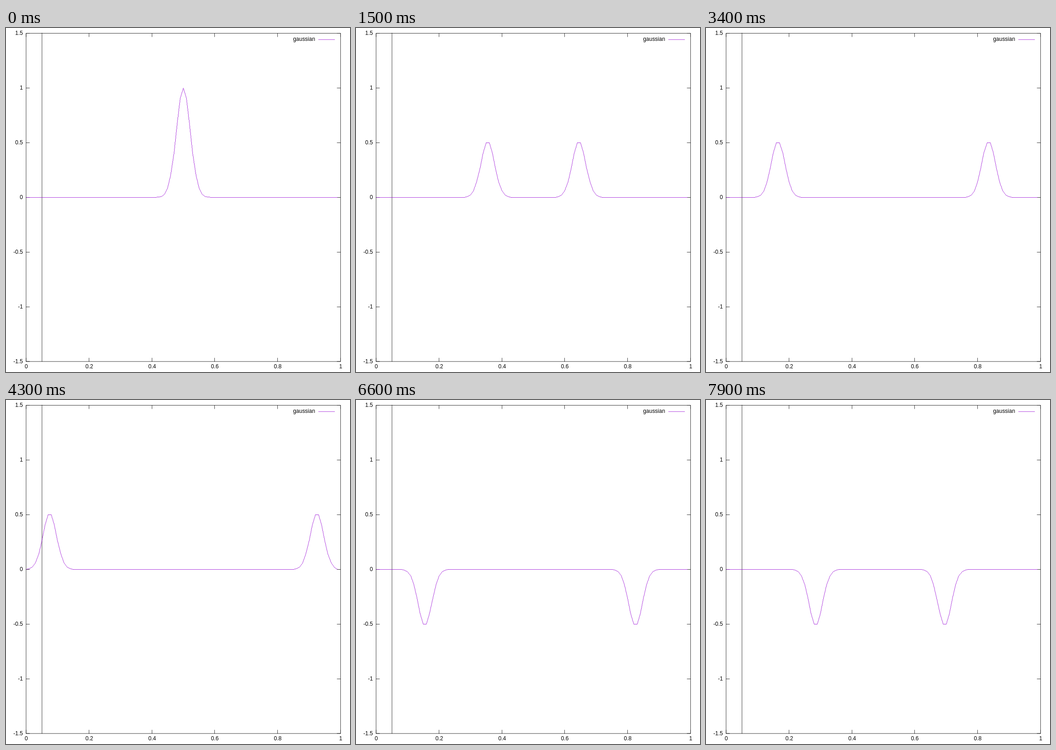
These frames come from a looping animation (748x748 px, 8 s). An HTML page with a canvas:

```html
<!DOCTYPE html>
<html lang="en">
<head>
<meta charset="utf-8">
<title>Wave on a string</title>
<style>
  html, body { margin: 0; width: 100%; height: 100%; overflow: hidden; background: #fff; }
  canvas { display: block; }
</style>
</head>
<body>
<canvas id="plot" width="748" height="748"></canvas>
<script>
// The plot is laid out on a 1000-unit grid of hard pixels, shrunk to the stage.
const SIZE = 1000, SCALE = 748 / SIZE;
const LEFT = 58, RIGHT = 972, TOP = 15, BOTTOM = 969, TICK = 10;
const STEP_MS = 100, STEPS = 80, POINTS = 100;
const BLACK = '#000', PURPLE = '#9400d3';

const ctx = document.getElementById('plot').getContext('2d');
ctx.scale(SCALE, SCALE);
ctx.font = '16px "Liberation Sans", Arial, sans-serif';

const toX = x => LEFT + Math.floor(x * (RIGHT - LEFT) + 0.5);
const toY = y => BOTTOM - Math.floor((y + 1.5) * (BOTTOM - TOP) / 3 + 0.5);

// Adds a stepped line, one unit thick, both ends included.
function line(x0, y0, x1, y1) {
  const dx = x1 - x0, dy = y1 - y0;
  if (!dx || !dy) {
    ctx.rect(Math.min(x0, x1), Math.min(y0, y1), Math.abs(dx) + 1, Math.abs(dy) + 1);
    return;
  }
  const n = Math.max(Math.abs(dx), Math.abs(dy));
  for (let i = 0; i <= n; i++) {
    ctx.rect(Math.round(x0 + dx * i / n), Math.round(y0 + dy * i / n), 1, 1);
  }
}

// Fills all lines of one colour together, so that touching pixels leave no seams.
function paint(color, addLines) {
  ctx.fillStyle = color;
  ctx.beginPath();
  addLines();
  ctx.fill();
}

function label(text, x, y, align) {
  ctx.fillStyle = BLACK;
  ctx.textAlign = align;
  ctx.fillText(text, x, y);
}

function addTicks() {
  for (let i = 0; i <= 5; i++) {
    const x = toX(i / 5);
    line(x, TOP, x, TOP + TICK);
    line(x, BOTTOM - TICK, x, BOTTOM);
  }
  for (let i = -3; i <= 3; i++) {
    const y = toY(i / 2);
    line(LEFT, y, LEFT + TICK, y);
    line(RIGHT - TICK, y, RIGHT, y);
  }
  line(toX(0.05), TOP - 1, toX(0.05), BOTTOM);
}

function addBorder() {
  line(LEFT, TOP, RIGHT, TOP);
  line(LEFT, BOTTOM, RIGHT, BOTTOM);
  line(LEFT, TOP, LEFT, BOTTOM);
  line(RIGHT, TOP, RIGHT, BOTTOM);
}

function addCurve(values) {
  for (let i = 1; i < POINTS; i++) {
    line(toX((i - 1) / POINTS), toY(values[i - 1]), toX(i / POINTS), toY(values[i]));
  }
}

function drawLabels() {
  for (let i = 0; i <= 5; i++) label(String(i / 5), toX(i / 5) + 1, 989, 'center');
  for (let i = -3; i <= 3; i++) label(String(i / 2), 49, toY(i / 2) + 5, 'right');
  label('gaussian', 898.5, 37, 'right');
}

// Wave equation at unit Courant number: fixed ends, released at rest.
function simulate() {
  const start = Array.from({ length: POINTS }, (_, i) =>
    Math.exp(-1000 * (i / POINTS - 0.5) ** 2));
  const states = [start, start];
  while (states.length < STEPS) {
    const [before, now] = states.slice(-2);
    states.push(now.map((_, i) =>
      i === 0 || i === POINTS - 1 ? 0 : now[i - 1] + now[i + 1] - before[i]));
  }
  return states;
}

function draw(values) {
  ctx.fillStyle = '#fff';
  ctx.fillRect(0, 0, SIZE, SIZE);
  paint(BLACK, addTicks);
  drawLabels();
  paint(PURPLE, () => {
    line(908, 33, 955, 33);
    addCurve(values);
  });
  paint(BLACK, addBorder);
}

const states = simulate();
const startTime = performance.now();
let shown = -1;

function render() {
  const step = Math.floor((performance.now() - startTime) / STEP_MS) % STEPS;
  if (step !== shown) {
    shown = step;
    draw(states[step]);
  }
  requestAnimationFrame(render);
}

render();
</script>
</body>
</html>
```
